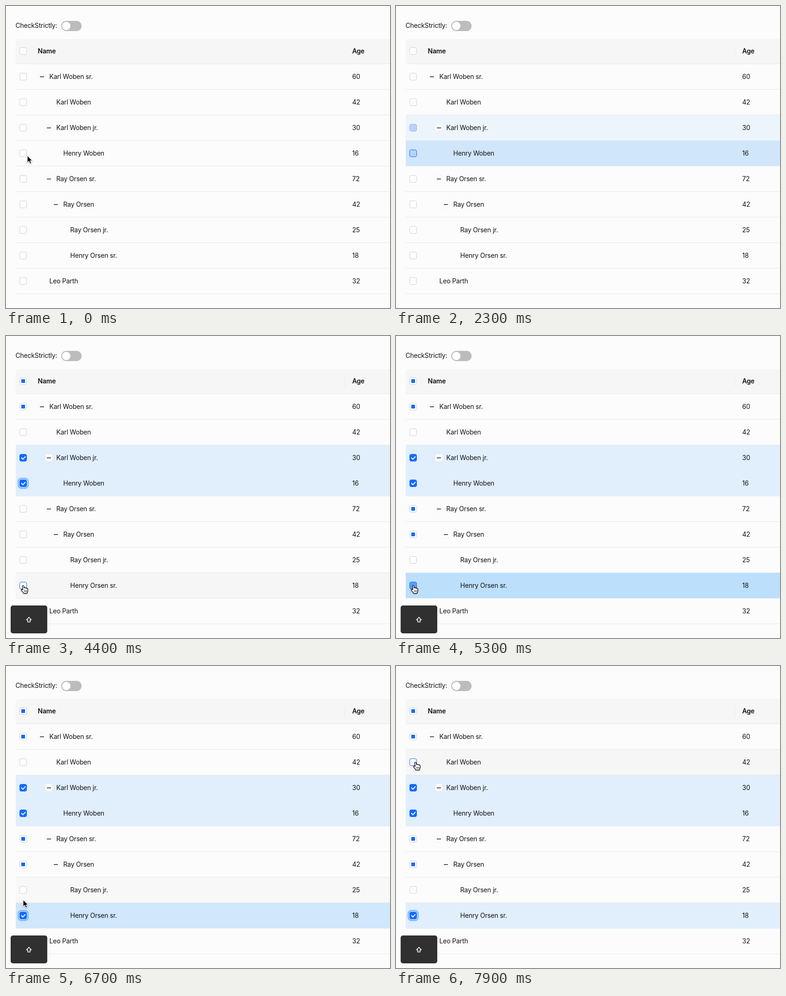
Animation of 828x650 px, one loop 8000 ms. Source, as an HTML page:

```html
<!DOCTYPE html>
<html lang="en">
<head>
<meta charset="utf-8">
<title>Tree table selection</title>
<style>
  html, body { margin: 0; width: 100%; height: 100%; overflow: hidden; background: #fcfcfc; }
  svg { display: block; width: 828px; height: 650px; }
  text { font: 14px Inter, "Open Sans", sans-serif; letter-spacing: -0.2px; fill: #121212; }
  .bold { font-weight: 600; }
</style>
</head>
<body>
<svg id="stage" viewBox="0 0 828 650" xmlns="http://www.w3.org/2000/svg"></svg>
<script>
const LOOP = 8000, STEP = 100;
const BLUE = '#116bff', LINE = '#e9e9e9';
const stage = document.getElementById('stage');

// name, age, level, expandable
const rows = [
  ['Karl Woben sr.', 60, 0, true],
  ['Karl Woben', 42, 1, false],
  ['Karl Woben jr.', 30, 1, true],
  ['Henry Woben', 16, 2, false],
  ['Ray Orsen sr.', 72, 1, true],
  ['Ray Orsen', 42, 2, true],
  ['Ray Orsen jr.', 25, 3, false],
  ['Henry Orsen sr.', 18, 3, false],
  ['Leo Parth', 32, 0, false]
];
const checkedAt = { 2: 2180, 3: 2180, 7: 5120 };
const partialAt = { head: 2400, 0: 2400, 4: 5200, 5: 5200 };
const focusSpan = { 3: [4300, 5150], 7: [6400, LOOP] };

const smooth = u => u * u * (3 - 2 * u);
const glide = u => 1 - Math.pow(1 - u, 2.9);
// start, end, x, y, easing
const start = [46, 322];
const moves = [
  [1000, 1500, 35, 315, smooth],
  [2500, 2900, 40, 315, smooth],
  [3510, 4200, 37, 537, glide],
  [6270, 6650, 37, 503, smooth],
  [6700, 7500, 42, 207, smooth]
];

function el(tag, attrs, parent = stage, content) {
  const node = document.createElementNS('http://www.w3.org/2000/svg', tag);
  for (const k in attrs) node.setAttribute(k, attrs[k]);
  if (content !== undefined) node.textContent = content;
  parent.appendChild(node);
  return node;
}
const set = (node, attrs) => { for (const k in attrs) node.setAttribute(k, attrs[k]); };
const show = (node, on) => node.setAttribute('visibility', on ? 'visible' : 'hidden');
const clamp = v => Math.max(0, Math.min(1, v));
const hex = c => [1, 3, 5].map(i => parseInt(c.slice(i, i + 2), 16));
const rgb = c => `rgb(${c.map(Math.round)})`;
const mix = (a, b, u) => a.map((v, i) => v + (b[i] - v) * u);

const PLAIN = hex('#fcfcfc'), HOVER = hex('#f6f6f6'), PICKED = hex('#e1eefc'),
  PICKED_HOVER = hex('#b6dcfd'), EDGE = hex(LINE), PICKED_EDGE = hex('#dfedfa'),
  WHITE = hex('#fefefe'), FRAME = hex('#d1d1d1'), FILL = hex(BLUE);

function label(x, y, str, cls = '') {
  el('text', { x, y, class: cls }, stage, str);
}

function checkbox(y) {
  const ring = el('rect', { x: 26.5, y: y - 10.5, width: 21, height: 21, rx: 6.5,
    fill: 'none', stroke: '#84befa', 'stroke-width': 3 });
  const box = el('rect', { x: 29.5, y: y - 7.5, width: 15, height: 15, rx: 3.5 });
  const dot = el('rect', { x: 33, y: y - 4, width: 8, height: 8, fill: BLUE });
  const tick = el('path', { d: `M33 ${y - .2}l3.35 3.35 5.75-5.75`, fill: 'none',
    stroke: '#fff', 'stroke-width': 2 });
  return { ring, box, dot, tick };
}

// Top bar and table header
label(20.5, 47, 'CheckStrictly:');
el('rect', { x: 119, y: 32, width: 44, height: 22, rx: 11, fill: '#bcbcbc' });
el('circle', { cx: 130, cy: 43, r: 9, fill: '#fff' });
el('path', { d: 'M21 124V79a8 8 0 0 1 8-8H828V124Z', fill: '#f6f6f6' });
el('rect', { x: 21, y: 124, width: 807, height: 1, fill: LINE });
const divider = el('rect', { x: 730, y: 86, width: 1, height: 23, fill: '#ebebeb' });
label(68.5, 102, 'Name', 'bold');
label(746.5, 102, 'Age', 'bold');
const boxes = { head: checkbox(97) };

const bands = rows.map(([name, age, level, open], i) => {
  const y = 152 + 55 * i, x = 77.5 + 15 * level;
  const bg = el('rect', { x: 21, y: y - 27, width: 807, height: 54 });
  const edge = el('rect', { x: 21, y: y + 27, width: 807, height: 1 });
  if (open) {
    el('rect', { x: x - 7.5, y: y - 7.5, width: 15, height: 15, rx: 4,
      fill: '#fefefe', stroke: '#f4f4f4' });
    el('rect', { x: x - 4.5, y: y - .3, width: 9, height: 1.4, fill: '#111' });
  }
  label(x + 16, y + 5, name);
  label(746.5, y + 5, age);
  boxes[i] = checkbox(y);
  return { bg, edge };
});

// Pressed-key badge
const badge = el('g', {});
el('rect', { x: 10, y: 580, width: 79, height: 60, rx: 5, fill: '#303030' }, badge);
el('path', { d: 'M49.4 605.4l5.2 5.6h-2.6v4.6h-5.2v-4.6h-2.6z', fill: 'none',
  stroke: '#fff', 'stroke-width': 1.5, 'stroke-linejoin': 'round' }, badge);

// Pointers, both drawn from their hot spot
const arrow = el('g', { style: 'filter:drop-shadow(0 1px 1px rgba(0,0,0,.35))' });
el('path', { d: 'M0 0v15.3l3.5-3.3 2.4 5.5 2.7-1.2-2.3-5.2h4.7z', fill: '#000',
  stroke: '#fff', 'stroke-width': 1.1 }, arrow);
const hand = el('g', { style: 'filter:drop-shadow(0 1px 1px rgba(0,0,0,.3))' });
el('path', { d: 'M-1.6 1.4C-1.6-.5 1.4-.5 1.6 1.4L2.1 5.5C2.5 4.2 4.6 4.3 4.9 5.7' +
  'C5.4 4.7 7.3 4.9 7.5 6.3C8.2 5.6 10 6 10 7.6V11C10 13 8.6 14 8.4 16.8H1' +
  'C.6 14.5-2.6 12.5-3.9 9.9C-4.6 8.3-2.8 7.3-1.3 8.8L-.6 9.4Z',
  fill: '#fff', stroke: '#000', 'stroke-width': 1.2, 'stroke-linejoin': 'round' }, hand);
el('path', { d: 'M2.6 10.3v3.6M4.8 10.3v3.6M7 10.3v3.6', stroke: '#000',
  'stroke-width': .9 }, hand);

function pointerAt(t) {
  let [x, y] = start;
  for (const [a, b, nx, ny, ease] of moves) {
    const u = ease(clamp((t - a) / (b - a)));
    x += (nx - x) * u;
    y += (ny - y) * u;
  }
  return [x, y];
}

const rowAt = t => t < 1950 ? -1 : Math.floor((pointerAt(t)[1] - 125) / 55);

// Share of the last moments spent over a row, which fades its hover tint
function hoverShare(t, i) {
  let hits = 0;
  for (let k = 0; k < 10; k++) if (rowAt(t - 60 - k * 20) === i) hits++;
  return hits / 10;
}

function drawBox(key, t, over) {
  const { ring, box, dot, tick } = boxes[key];
  const p = clamp((t - checkedAt[key]) / 220 || 0);
  const span = focusSpan[key];
  set(box, {
    fill: rgb(mix(WHITE, FILL, p * p)),
    stroke: over ? BLUE : rgb(mix(FRAME, FILL, p * p))
  });
  show(tick, p >= 1);
  show(dot, t >= partialAt[key]);
  show(ring, span && t >= span[0] && t < span[1]);
}

function draw(t) {
  const [x, y] = pointerAt(t);
  const row = rowAt(t);
  const onBox = row >= 0 && x >= 29 && x <= 45 && Math.abs(y - 152 - 55 * row) <= 8;

  drawBox('head', t, false);
  bands.forEach(({ bg, edge }, i) => {
    const w = hoverShare(t, i);
    const p = clamp((t - checkedAt[i]) / 200 || 0);
    set(bg, { fill: rgb(mix(mix(PLAIN, HOVER, w), mix(PICKED, PICKED_HOVER, w), p)) });
    set(edge, { fill: rgb(mix(EDGE, PICKED_EDGE, p)) });
    drawBox(i, t, onBox && row === i);
  });

  show(divider, t >= 100);
  show(badge, (t >= 4300 && t < 6100) || t >= 6400);

  const asHand = onBox && t > 2200;
  const gone = t >= 2200 && t < 2400;
  show(arrow, !asHand && !gone);
  show(hand, asHand && !gone);
  const place = { transform: `translate(${x.toFixed(2)} ${y.toFixed(2)})` };
  set(arrow, place);
  set(hand, place);
}

let origin;
function tick(now) {
  if (origin === undefined) origin = now;
  const t = Math.max(0, now - origin) % LOOP;
  draw(Math.floor(t / STEP) * STEP);
  requestAnimationFrame(tick);
}
draw(0);
requestAnimationFrame(tick);
</script>
</body>
</html>
```
